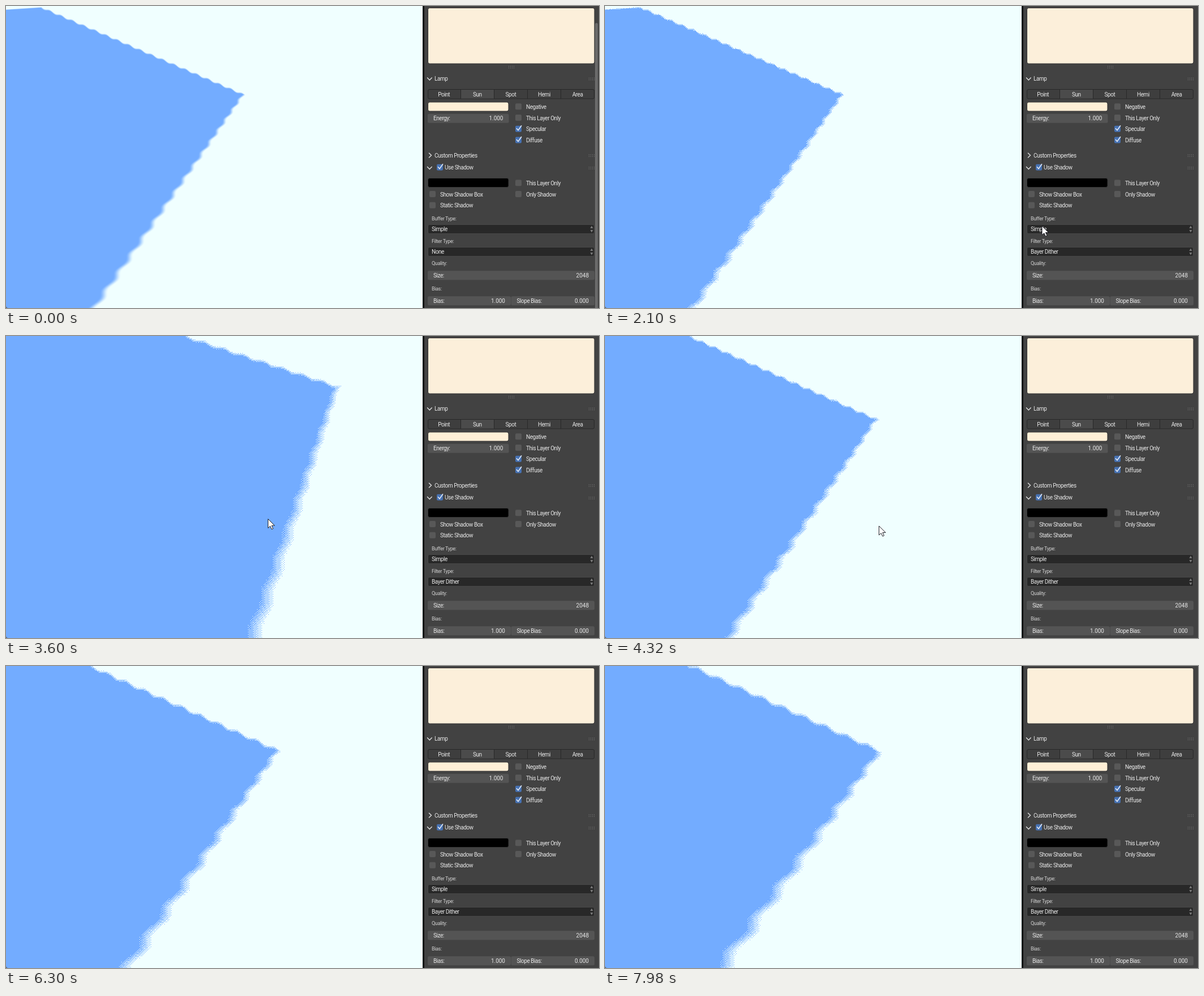
An HTML page with a canvas that plays this animation: 1049x534 px, repeating every 8 s.

```html
<!DOCTYPE html>
<html lang="en">
<head>
<meta charset="utf-8">
<title>Lamp shadow filter</title>
<style>
html, body { margin: 0; width: 100%; height: 100%; overflow: hidden; background: #424242; }
canvas, svg { position: absolute; left: 0; top: 0; display: block; }
text { font: 10px Roboto, sans-serif; letter-spacing: -.45px; fill: #e8e8e8; white-space: pre; }
text.num { letter-spacing: 0; text-anchor: end; }
text.mid { text-anchor: middle; }
text.small { font-size: 9px; letter-spacing: -.36px; fill: #d2d2d2; }
text.menu { fill: #f4f4f4; }
</style>
</head>
<body>
<canvas id="scene" width="737" height="534"></canvas>
<svg id="ui" width="1049" height="534" viewBox="0 0 1049 534"></svg>
<script>
const LOOP = 8000, STEP = 60, W = 737, H = 534;
const LEFT = 746, FULL = 295, HALF = 143, ROW = 19.75;
const ui = document.getElementById('ui');

function add(tag, attrs, parent = ui) {
  const el = document.createElementNS('http://www.w3.org/2000/svg', tag);
  for (const k in attrs) el.setAttribute(k, attrs[k]);
  return parent.appendChild(el);
}
const box = (x, y, width, height, fill, rx = 2.5, parent = ui) =>
  add('rect', { x, y, width, height, fill, rx }, parent);
const line = (d, stroke = '#e2e2e2', width = 1.3, parent = ui) =>
  add('path', { d, stroke, 'stroke-width': width, fill: 'none' }, parent);
function label(str, x, midY, cls = '', parent = ui) {
  const el = add('text', { x, y: Math.round(midY + 3.5), class: cls }, parent);
  el.textContent = str;
  return el;
}
function checkbox(x, y, on, name) {
  box(x, y - 6, 11, 11, on ? '#4772b3' : '#585858', 2);
  if (on) line(`M${x + 2} ${y - 1.5}l3 3.5 6 -8.5`, '#e8edf5', 1.5);
  label(name, x + (on === 'header' ? 14 : 19), y);
}
function swatch(y, width, height, fill) {
  box(LEFT + .5, y, width - .5, height, fill, 3).setAttribute('stroke', '#343434');
}
function grip(x, y) {
  for (let i = 0; i < 8; i++) box(x + (i % 4) * 3, y + (i >> 2) * 3, 1, 1, '#858585', 0);
}
function header(name, y, open) {
  line(open ? `M745 ${y - 2}l4.3 4.5 4.3 -4.5` : `M748 ${y - 4.3}l4.5 4.3 -4.5 4.3`);
  if (name) label(name, 758, y);
  grip(1031, y - 1.5);
}
function field(y, name, value, x = LEFT, right = LEFT + FULL) {
  box(x, y - 8, right - x, 16, '#545454');
  label(name, x + 10, y);
  label(value, right - 10, y, 'num');
}
function dropdown(y, name, str) {
  label(name, 753, y - 19, 'small');
  const back = box(LEFT + .5, y - 8, FULL - 1, 16, '#282828');
  back.setAttribute('stroke', '#484848');
  for (const s of [-1, 1])
    add('path', { d: `M1033.5 ${y + s * 1.5}h5l-2.5 ${s * 4.5}z`, fill: '#7c7c7c' });
  return { back, text: label(str, 753, y) };
}

// Properties panel
box(737, 0, 3, H, '#080808', 0);
box(740, 0, 309, H, '#424242', 0);
swatch(3.5, FULL, 98.5, '#fcefda');
grip(889, 106);
header('Lamp', 128.5, true);
box(LEFT + .5, 147.5, FULL - 1, 16.5, '#3e3e3e').setAttribute('stroke', '#282828');
box(805, 148, 58.5, 15.5, '#4b4b4b', 0);
['Point', 'Sun', 'Spot', 'Hemi', 'Area'].forEach((name, i) => {
  label(name, 774.7 + i * 59.1, 156.3, 'mid');
  if (i) line(`M${745.5 + i * 59} 148v16`, '#282828', 1);
});
swatch(170, HALF, 16, '#feefd6');
field(198.7, 'Energy:', '1.000', LEFT, LEFT + HALF + .5);
['Negative', 'This Layer Only', 'Specular', 'Diffuse'].forEach((name, i) =>
  checkbox(901, 178.3 + i * ROW, i > 1, name));
header('Custom Properties', 264, false);
header('', 286, true);
checkbox(762, 285.7, 'header', 'Use Shadow');
swatch(304.5, HALF, 16, '#000');
['This Layer Only', 'Only Shadow'].forEach((name, i) => checkbox(901, 313.3 + i * ROW, false, name));
['Show Shadow Box', 'Static Shadow'].forEach((name, i) => checkbox(749, 333 + i * ROW, false, name));
dropdown(394.5, 'Buffer Type:', 'Simple');
const filter = dropdown(434.5, 'Filter Type:', 'None');
label('Quality:', 753, 454.7, 'small');
field(476.3, 'Size:', '2048');
label('Bias:', 753, 499.5, 'small');
field(521.3, 'Bias:', '1.000', LEFT, 893);
field(521.3, 'Slope Bias:', '0.000', 893.5);
const scrollbar = box(1042, 30, 5, 510, '#6b6b6b');

// Filter menu
const menu = add('g', {});
box(744.5, 274, FULL, 150, '#1b1b1b', 2, menu);
line('M745 301.5h294', '#2e2e2e', 1, menu);
const hover = box(744.5, 384, FULL, ROW, '#4772b3', 0, menu);
label('Shadow Map Filter Type', 751, 288.7, 'small menu', menu);
['_PCF Jitter', 'PCF _Early Bail', 'P_CF', '_Factor Clipping', '_Bayer Dither', '_None'].forEach((name, i) => {
  const [before, after] = name.split('_');
  const el = label(before, 751, 314.3 + i * ROW, 'menu', menu);
  add('tspan', { 'text-decoration': 'underline' }, el).textContent = after[0];
  el.append(after.slice(1));
});

add('path', { d: 'M0 534v-4q0 4 4 4z', fill: '#555' });
const cursor = add('path', {
  d: 'M0 0v16l3.8 -3.4 2.6 5.6 2.6 -1.2 -2.6 -5.4h5.2z',
  fill: '#fff', stroke: '#1c1c24', 'stroke-width': 1
});

// Motion: each move eases from wherever the last one ended
const clamp = v => Math.min(1, Math.max(0, v));
const smooth = p => p * p * (3 - 2 * p);
const ease = (t, from, to) => smooth(clamp((t - from) / (to - from)));
const mix = (a, b, p) => a.map((v, i) => v + (b[i] - v) * p);
const follow = (t, first, moves) =>
  moves.reduce((pos, { from, to, goal }) => mix(pos, goal, ease(t, from, to)), first);

const cursorMoves = [
  { from: 60, to: 900, goal: [771, 433] },
  { from: 1200, to: 1620, goal: [773, 389] },
  { from: 2100, to: 2640, goal: [459, 319] },
  { from: 3060, to: 3720, goal: [464, 324] },
  { from: 4260, to: 4680, goal: [838, 540] }
];
// Shadow pose: top x, tip x, tip y, foot x, tooth size
const firstPose = [57, 419, 156, 155, 16];
const shadowMoves = [
  { from: 2400, to: 2760, goal: [203, 539, 124, 325, 28] },
  { from: 3060, to: 3720, goal: [325, 589, 86, 448, 28] },
  { from: 3840, to: 4080, goal: [148, 479, 147, 217, 19] },
  { from: 5280, to: 6960, goal: [148, 480, 150, 212, 30] },
  { from: 6960, to: 7980, goal: [152, 485, 150, 206, 30] }
];
const toothPhase = t => .25 + .05 * ease(t, 5280, 6960)
  + .3 * (ease(t, 6960, 7440) + ease(t, 7740, 7980));

// Shadow: two stair-stepped edges with a soft or ordered-dither border
const ctx = document.getElementById('scene').getContext('2d');
const image = ctx.createImageData(W, H), px = image.data;
const LIGHT = [240, 255, 255], SHADE = [115, 172, 255], GROWTH = .0032;
const quad = (a, b) => 2 * (a ^ b) + b;
const bayer = (x, y) => (4 * quad(x & 1, y & 1) + quad(x >> 1 & 1, y >> 1 & 1) + .5) / 16;
const wave = n => Math.sin(2 * Math.PI * n) / (2 * Math.PI);

function drawShadow([topX, tipX, tipY, footX, size], phase, dither) {
  const upSlope = tipY / (tipX - topX), downSlope = (footX - tipX) / (H - tipY);
  const upSize = size * 1.25, upWidth = size * .22;
  const upper = Array.from({ length: W }, (_, x) =>
    (x - topX) * upSlope - upSlope * upSize * wave((x - topX) / upSize + phase));
  for (let y = 0, o = 0; y < H; y++) {
    const depth = Math.max(.5, 1 + GROWTH * (y - tipY));
    const tooth = size * depth, width = tooth * .45;
    const edge = tipX + (y - tipY) * downSlope
      - downSlope * tooth * wave(Math.log(depth) / (GROWTH * size) + phase);
    for (let x = 0; x < W; x++, o += 4) {
      const farEdge = (y - 6 + .065 * x + (topX - firstPose[0]) / 2) / 2;
      let c = clamp(Math.min((edge - x) / width, (y - upper[x]) / upWidth, farEdge) + .5);
      c = dither ? +(c > bayer(x, y)) : smooth(c);
      mix(LIGHT, SHADE, c).forEach((v, k) => px[o + k] = v);
      px[o + 3] = 255;
    }
  }
  ctx.putImageData(image, 0, 0);
}

let drawn = '';
function render(time) {
  const t = Math.floor(time % LOOP / STEP) * STEP, dither = t >= 2100;
  const pose = follow(t, firstPose, shadowMoves), phase = toothPhase(t);
  const key = [pose, phase, dither].join();
  if (key !== drawn) drawShadow(pose, phase, dither);
  drawn = key;

  const [x, y] = follow(t, [1062, 500], cursorMoves);
  const open = t >= 1020 && !dither, pressed = t >= 960 && !dither;
  cursor.setAttribute('transform', `translate(${x} ${y})`);
  scrollbar.setAttribute('opacity',
    1 - ease(t, 60, 600) + .3 * (ease(t, 5280, 5520) - ease(t, 5760, 6120)));
  menu.setAttribute('visibility', open ? 'visible' : 'hidden');
  hover.setAttribute('visibility', open && y < 423 ? 'visible' : 'hidden');
  hover.setAttribute('y', y < 403 ? 384 : 384 + ROW);
  filter.back.setAttribute('fill', pressed ? '#4772b3' : '#282828');
  filter.text.textContent = dither ? 'Bayer Dither' : 'None';
}

const start = performance.now();
function tick() {
  render(performance.now() - start);
  requestAnimationFrame(tick);
}
tick();
</script>
</body>
</html>
```
